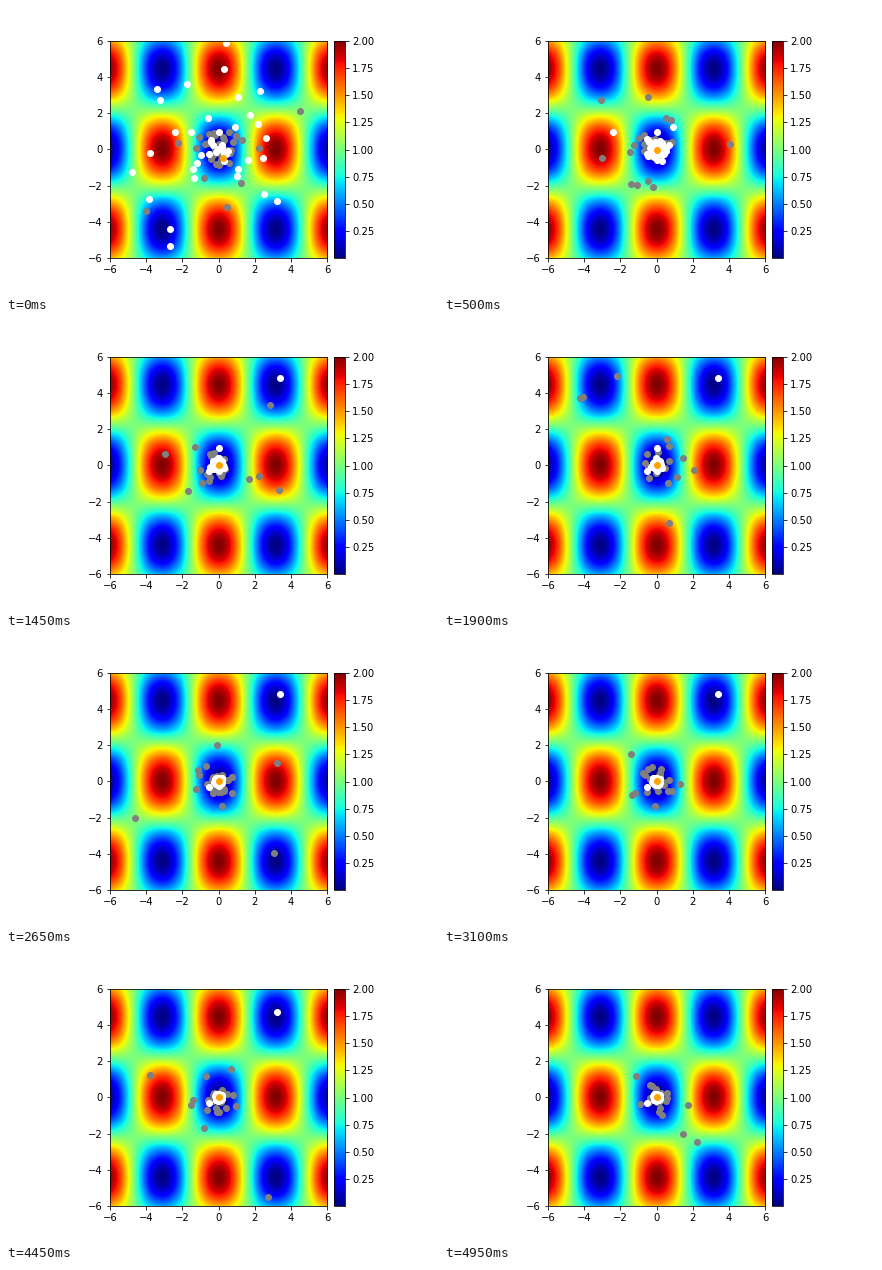
Write a matplotlib script that moves like this. It is 432 px wide and 288 px high and loops after 5 s.

```python
import numpy as np
import matplotlib.pyplot as plt
from matplotlib.animation import FuncAnimation

W, H, DPI = 432, 288, 72
FRAMES, INTERVAL = 100, 50
NESTS = 46
FLIGHTS = 50
LIMIT = 6

# Nests that stay put for a while: x, y, first generation, end.
LASTING = [
    (0.0, 0.95, 0, 44),
    (3.4, 4.8, 29, 70),
    (3.22, 4.7, 70, 92),
    (-0.55, -0.3, 24, FRAMES),
]

rng = np.random.default_rng(7)


def griewank(x, y):
    return 1 + (x**2 + y**2) / 4000 - np.cos(x) * np.cos(y / np.sqrt(2))


def scatter_round(radius):
    """Points at the given distances from the optimum, in random directions."""
    angle = rng.uniform(0, 2 * np.pi, len(radius))
    return np.column_stack([radius * np.cos(angle), radius * np.sin(angle)])


def evolve():
    """Nests of every generation; those far from the optimum get replaced."""
    nests = scatter_round(LIMIT * rng.random(NESTS) ** 1.8)
    history = [nests.copy()]
    for k in range(1, FRAMES):
        spread = 0.1 + 0.35 * np.exp(-k / 18)
        far = np.hypot(*nests.T) > 2.2 * spread
        moved = far & (rng.random(NESTS) < 0.3)
        nests[moved] = rng.normal(0, spread, (moved.sum(), 2))
        history.append(nests.copy())
    return history


def levy_flights(k):
    """Heavy-tailed steps around the optimum, shorter with time."""
    scale = 0.22 + 0.35 * np.exp(-k / 35)
    return scatter_round(scale * np.abs(rng.standard_cauchy(FLIGHTS)))


def nests_at(k):
    lasting = [(x, y) for x, y, first, end in LASTING if first <= k < end]
    return np.vstack([HISTORY[k], lasting])


def best_at(k):
    """The best nest improves every few generations."""
    return np.array([0.22, -0.48]) * 0.4 ** (k // 3)


HISTORY = evolve()
STEPS = [levy_flights(k) for k in range(FRAMES)]

fig = plt.figure(figsize=(W / DPI, H / DPI), dpi=DPI, facecolor="white")
side = 0.755 * H
ax = fig.add_axes([103.8 / W, 0.125, side / W, 0.755])
cax = fig.add_axes([328.3 / W, 0.125, side / 20 / W, 0.755])

grid = np.linspace(-LIMIT, LIMIT, 200)
image = ax.imshow(griewank(*np.meshgrid(grid, grid)), cmap="jet",
                  origin="lower", extent=[-LIMIT, LIMIT, -LIMIT, LIMIT])
fig.colorbar(image, cax=cax)
ax.set(xlim=(-LIMIT, LIMIT), ylim=(-LIMIT, LIMIT))
ax.set_xticks(range(-LIMIT, LIMIT + 1, 2))
ax.set_yticks(range(-LIMIT, LIMIT + 1, 2))


def dots(color, order):
    return ax.scatter([], [], s=36, color=color, zorder=order)


flights, nests, best = dots("gray", 2), dots("white", 2.1), dots("orange", 2.2)


def update(k):
    flights.set_offsets(STEPS[k])
    nests.set_offsets(nests_at(k))
    best.set_offsets([best_at(k)])
    return flights, nests, best


anim = FuncAnimation(fig, update, frames=FRAMES, interval=INTERVAL,
                     repeat=True, repeat_delay=0)
plt.show()
```
